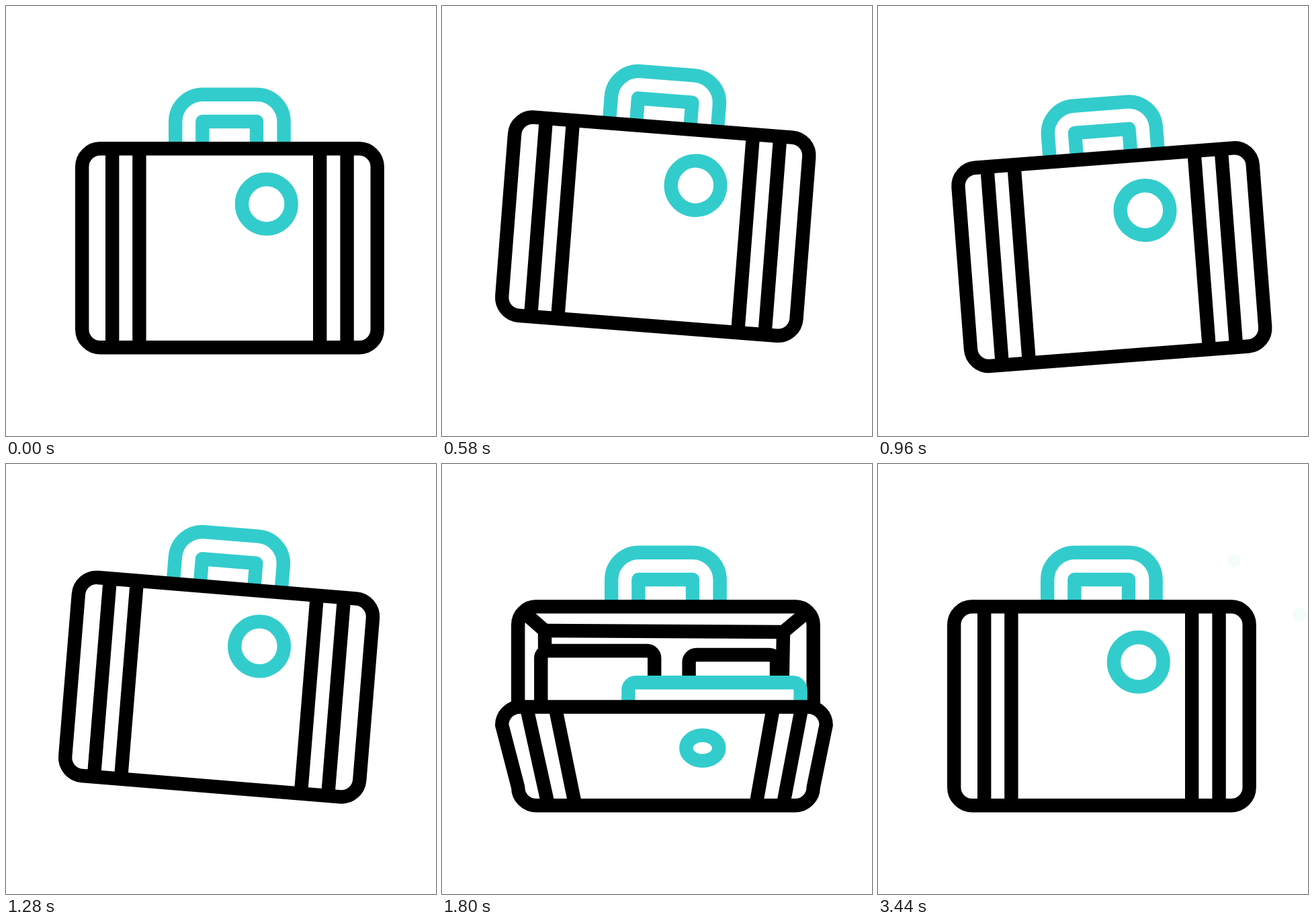
Recreate the animation shown at these times as an HTML page with a canvas. Size 640 by 640 pixels, loop 3580 ms.

```html
<!DOCTYPE html>
<html lang="en">
<head>
<meta charset="utf-8">
<title>Suitcase</title>
<style>
  html, body { margin: 0; width: 100%; height: 100%; overflow: hidden; background: #fff; }
  canvas { display: block; width: 100vmin; height: 100vmin; }
</style>
</head>
<body>
<canvas id="stage" width="640" height="640"></canvas>
<script>
const ctx = document.getElementById('stage').getContext('2d');
const LOOP = 3580, STEP = 20;
const BLACK = '#000', TEAL = '#33cccc', LINE = 20.4;
const LEFT = 113.2, RIGHT = 552.7, TOP = 212.3, BOTTOM = 508.3, ROUND = 27;
const PIVOT = { x: 333, y: 165 };

// [time, value] keys, joined by sine easing
const TILT = [[365, 0], [690, 6], [1045, -6], [1345, 6], [1600, 0]];
const LIFT = [[200, 0], [360, 14], [600, -32.3], [690, -32.3], [950, 14],
              [1265, -27.5], [1345, -27], [1590, 12], [1700, 0]];

const clamp = x => Math.max(0, Math.min(1, x));
const mix = (a, b, k) => a + (b - a) * k;
const sine = x => (1 - Math.cos(Math.PI * clamp(x))) / 2;
const easeOut = x => 1 - (1 - clamp(x)) ** 3;

function track(keys, t) {
  let value = keys[0][1];
  for (let i = 1; i < keys.length; i++) {
    const [t0, v0] = keys[i - 1], [t1, v1] = keys[i];
    if (t > t0) value = mix(v0, v1, sine((t - t0) / (t1 - t0)));
  }
  return value;
}

function openness(t) {
  return t < 2920 ? sine((t - 1560) / 240) : 1 - easeOut((t - 2920) / 222);
}

function paint(color, fill) {
  if (fill) {
    ctx.fillStyle = '#fff';
    ctx.fill();
  }
  ctx.strokeStyle = color;
  ctx.stroke();
}

function line(color, ...points) {
  ctx.beginPath();
  points.forEach(([x, y]) => ctx.lineTo(x, y));
  paint(color);
}

// An upside-down U with rounded shoulders
function arch(color, x0, x1, top, bottom, r, fill) {
  ctx.beginPath();
  ctx.moveTo(x0, bottom);
  ctx.arcTo(x0, top, x1, top, r);
  ctx.arcTo(x1, top, x1, bottom, r);
  ctx.lineTo(x1, bottom);
  paint(color, fill);
}

function drawHandle() {
  arch(TEAL, 252.2, 413.6, 131.7, TOP, 40.5);
  arch(TEAL, 292.4, 373, 172, TOP, 0);
}

function drawInside() {
  arch(BLACK, LEFT, RIGHT, TOP, 470, ROUND, true);
  line(BLACK, [121, 220], [153, 248], [154, 470]);
  line(BLACK, [545, 219], [508, 250], [504, 470]);
  line(BLACK, [153, 248], [508, 250]);
  arch(BLACK, 147.3, 316.2, 278, 470, 11, true);
  arch(BLACK, 367.6, 498, 284, 470, 11, true);
  arch(TEAL, 277.4, 533.6, 325.2, 470, 11, true);
}

function drawFront(p) {
  const top = mix(TOP, 361.5, p);
  const x0 = LEFT - 24 * p, x1 = RIGHT + 19 * p;
  const low = BOTTOM - ROUND;

  ctx.beginPath();
  ctx.moveTo(LEFT + ROUND, BOTTOM);
  ctx.arcTo(LEFT, BOTTOM, LEFT, low, ROUND);
  ctx.lineTo(x0, top + ROUND);
  ctx.arcTo(x0, top, x0 + ROUND, top, ROUND);
  ctx.lineTo(x1 - ROUND, top);
  ctx.arcTo(x1, top, x1, top + ROUND, ROUND);
  ctx.lineTo(RIGHT, low);
  ctx.arcTo(RIGHT, BOTTOM, RIGHT - ROUND, BOTTOM, ROUND);
  ctx.closePath();
  paint(BLACK, true);

  ctx.lineCap = 'butt';
  for (const [x, flare] of [[158.2, -32.5], [198.4, -30], [467.2, 26], [507.6, 28]]) {
    line(BLACK, [x + flare * p, top], [x, BOTTOM]);
  }

  ctx.beginPath();
  ctx.ellipse(387.8, mix(294.8, 422.8, p), mix(36.8, 24.5, p), mix(36.8, 19, p), 0, 0, 2 * Math.PI);
  paint(TEAL);
}

// Two short strokes shooting away from the corner
function drawSpark(t) {
  if (t < 3080) return;
  const head = easeOut((t - 3060) / 240), tail = sine((t - 3180) / 260);
  ctx.globalAlpha = mix(1, 0.05, clamp((t - 3300) / 140));
  ctx.lineCap = 'round';
  for (const [x0, y0, x1, y1] of [[543, 183, 530, 144], [589, 218, 628, 224]]) {
    const at = k => [mix(x0, x1, k), mix(y0, y1, k)];
    line(TEAL, at(Math.min(tail, 0.999)), at(Math.max(head, 0.001)));
  }
  ctx.globalAlpha = 1;
  ctx.lineCap = 'butt';
}

function draw(t) {
  ctx.fillStyle = '#fff';
  ctx.fillRect(0, 0, 640, 640);
  ctx.lineWidth = LINE;
  ctx.lineJoin = 'round';
  ctx.lineCap = 'butt';

  drawSpark(t);
  ctx.save();
  ctx.translate(PIVOT.x, PIVOT.y + track(LIFT, t));
  ctx.rotate(track(TILT, t) * Math.PI / 180);
  ctx.translate(-PIVOT.x, -PIVOT.y);
  const p = openness(t);
  drawHandle();
  if (p > 0) drawInside();
  drawFront(p);
  ctx.restore();
}

let start;
function frame() {
  const now = performance.now();
  start ??= now;
  const t = (now - start) % LOOP;
  draw(Math.floor(t / STEP) * STEP);
  requestAnimationFrame(frame);
}
frame();
</script>
</body>
</html>
```
